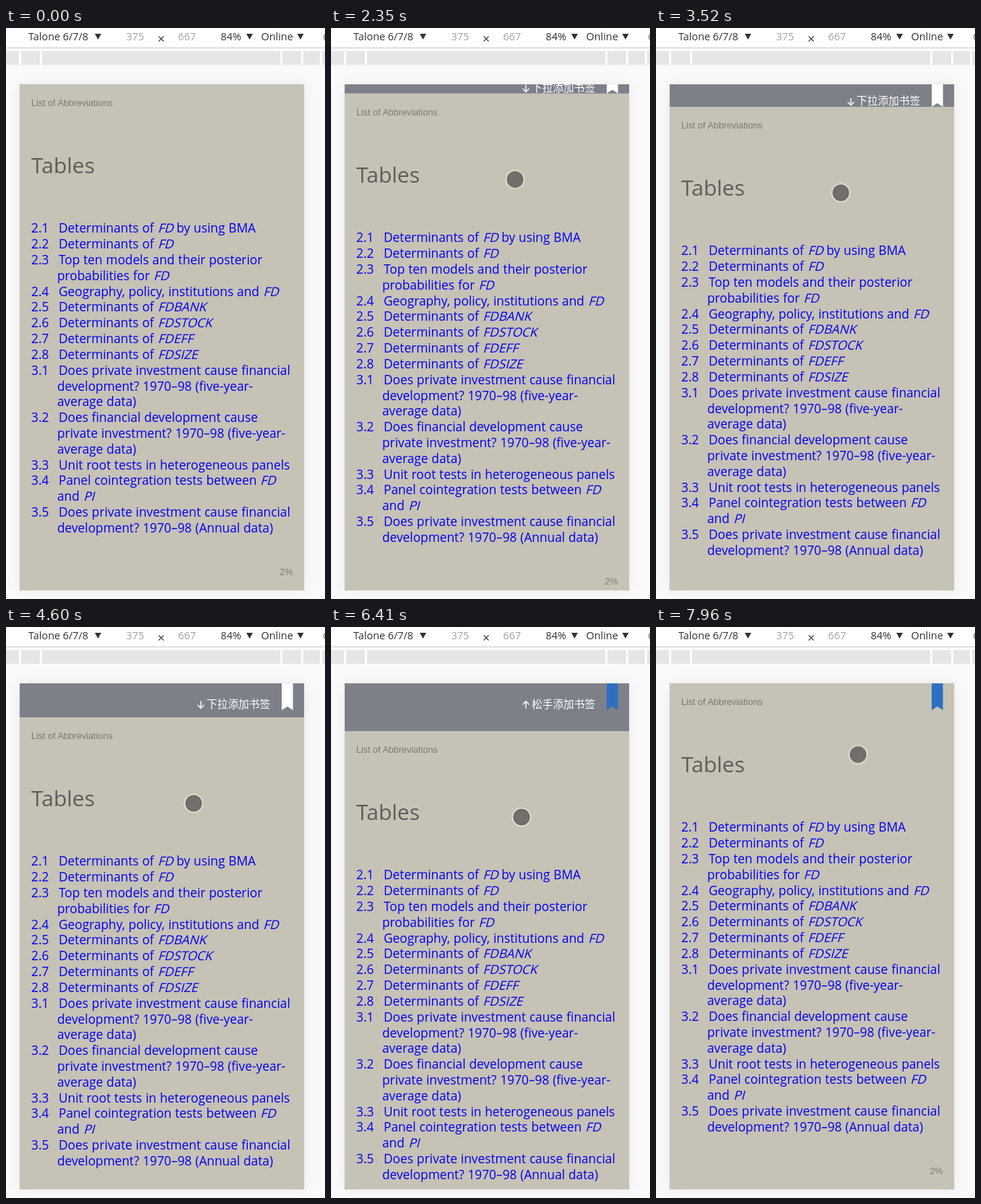
These frames come from a looping animation (442x790 px, 8 s). An HTML page:

```html
<!DOCTYPE html>
<html lang="en">
<head>
<meta charset="utf-8">
<title>Pull down to bookmark</title>
<style>
/* --pull: finger travel, --grip: how far the page follows it, --pin: bookmark held in place */
@property --pull { syntax: "<length>"; inherits: true; initial-value: 0px; }
@property --grip { syntax: "<number>"; inherits: true; initial-value: 0; }
@property --pin { syntax: "<length>"; inherits: true; initial-value: 0px; }
@property --x { syntax: "<length>"; inherits: true; initial-value: 365px; }

html, body { margin: 0; width: 100%; height: 100%; overflow: hidden; background: #fafafa; }
#stage {
  position: relative; width: 442px; height: 790px; overflow: hidden; background: #fafafa;
  font-family: "Open Sans", "Noto Sans", sans-serif;
  animation: pull 8s linear infinite, grip 8s linear infinite, pin 8s step-end infinite, drift 8s linear infinite;
}
#stage div, #stage svg, #stage span, h1 { position: absolute; margin: 0; }
#stage span, h1 { white-space: pre; }

#bar { left: 0; top: 0; width: 442px; height: 27px; background: #fff; border-bottom: 1px solid #ccc;
  font-size: 14.4px; line-height: 24px; color: #333; }
#bar span { top: 0; }
#bar .dim { color: #a3a3a3; }
#ruler { left: 0; top: 32px; width: 442px; height: 19px; background:
  linear-gradient(90deg, #e6e6e6 18px, #fff 18px 21px, #e6e6e6 21px 47px, #fff 47px 50px, #e6e6e6 50px 380px,
  #fff 380px 383px, #e6e6e6 383px 409px, #fff 409px 412px, #e6e6e6 412px 435px, #fff 435px 438px, #e6e6e6 438px); }

#device { left: 19px; top: 78px; width: 394px; height: 700px; overflow: hidden; background: #7d8089;
  box-shadow: 0 0 0 1px #e9e9e8, 0 0 20px rgba(0, 0, 0, .07);
  --d: calc(max(0px, var(--pull)) * var(--grip)); }

#hint { left: 0; top: -19.3px; width: 394px; height: 20px; color: #fff;
  font: 500 14.7px/20px "Noto Sans CJK SC", "Noto Sans CJK", sans-serif;
  transform: translateY(min(var(--d), 36.5px)); }
#hint span { left: 259px; top: 0; }
#hint svg { left: 245px; top: 6px; animation: flip 8s linear infinite; }
.before { animation: before 8s step-end infinite; }
.after { animation: after 8s step-end infinite; }

#page { left: 0; top: 0; width: 394px; height: 700px; background: #c6c2b6; transform: translateY(var(--d)); }
.note { font: 12.6px/20px "Liberation Sans", Arial, sans-serif; color: #7b7a77; }
h1 { left: 16px; top: 92.4px; font-size: 30px; line-height: 40px; font-weight: 400; color: #5f5d59; }
#list { left: 16px; top: 188.4px; font-size: 17.3px; line-height: 21.82px; word-spacing: .4px; color: #00e; }
#list p { margin: 0; height: 21.82px; white-space: pre; }
#list b { display: inline-block; width: 38px; font-weight: 400; }
#list i { display: inline-block; font-style: normal; transform: skewX(-15deg); transform-origin: 0 81%; }
#list .more { padding-left: 36px; }

#mark { left: 363px; top: -37px; width: 15.6px; height: 37px; background: #fff;
  clip-path: polygon(0 0, 100% 0, 100% 100%, 50% 32px, 0 100%);
  transform: translateY(max(min(var(--d), 37px), var(--pin)));
  animation: tint 8s step-end infinite; }

#touch { left: -14px; top: 182.5px; width: 28px; height: 28px; border-radius: 50%;
  background: radial-gradient(circle, #706f6b 9.5px, #62615d 11px, #dddace 11.8px 13px, rgba(221, 218, 206, 0) 14px);
  transform: translate(var(--x), var(--pull)); animation: show 8s step-end infinite; }

@keyframes pull {
  0%, 2.375% { --pull: 576.5px; animation-timing-function: ease-in-out; }
  12%, 12.99% { --pull: 58.5px; }
  17.75%, 20.625% { --pull: -10.5px; }
  21.625% { --pull: 1px; }
  29.375% { --pull: 12.5px; }
  30.375%, 31.3% { --pull: 14px; }
  36.125%, 38% { --pull: 25px; }
  39% { --pull: 27px; }
  44% { --pull: 31px; }
  44.875% { --pull: 33px; }
  46.875% { --pull: 34px; }
  48.75% { --pull: 35px; }
  51.625%, 52.5% { --pull: 38px; }
  57.5%, 59.4% { --pull: 47px; }
  64.25% { --pull: 53px; }
  66.125% { --pull: 54px; }
  68.25% { --pull: 57px; }
  72.125%, 76.1% { --pull: 63px; }
  78.25% { --pull: 64px; }
  80.125%, 82.9% { --pull: 66px; }
  84% { --pull: 68px; }
  86.875%, 90.7% { --pull: 69px; }
  93.125%, 93.75% { --pull: 72px; }
  99.5%, 100% { --pull: -20.5px; }
}
@keyframes drift {
  0%, 2.375% { --x: 365px; animation-timing-function: ease-in-out; }
  12%, 12.99% { --x: 246px; }
  17.75% { --x: 252px; }
  29.375% { --x: 255px; }
  44% { --x: 256px; }
  57.5% { --x: 260px; }
  68.25% { --x: 262px; }
  80.125%, 83% { --x: 264px; }
  93.75% { --x: 266px; }
  99.5%, 100% { --x: 280px; }
}
@keyframes grip {
  0%, 20.62% { --grip: 0; }
  20.63%, 93.75% { --grip: 1; animation-timing-function: ease; }
  97.5%, 100% { --grip: 0; }
}
@keyframes pin { 0% { --pin: 0px; } 70.125%, 100% { --pin: 37px; } }
@keyframes tint { 0% { background: #fff; } 70.125%, 100% { background: #2f6fc2; } }
@keyframes before { 0% { opacity: 1; } 70.125%, 100% { opacity: 0; } }
@keyframes after { 0% { opacity: 0; } 70.125%, 100% { opacity: 1; } }
@keyframes flip { 0%, 70.125% { transform: none; } 72%, 100% { transform: rotate(180deg); } }
@keyframes show { 0% { opacity: 0; } 2.375%, 100% { opacity: 1; } }
</style>
</head>
<body>
<div id="stage">
  <div id="bar">
    <span style="left:31px">Talone 6/7/8</span>
    <span class="dim" style="left:166.5px">375</span>
    <span class="dim" style="left:238.5px">667</span>
    <span style="left:297.5px">84%</span>
    <span style="left:353.5px">Online</span>
    <svg width="442" height="27" style="left:0;top:0">
      <path fill="#333" d="M123 8h9l-4.5 8zM333 8h9l-4.5 8zM403.5 8h9l-4.5 8z"/>
      <path stroke="#444" stroke-width="1.3" d="M211.5 11.5l7 7m0-7l-7 7"/>
      <circle cx="446" cy="12.5" r="5.5" fill="none" stroke="#777" stroke-width="1.3"/>
    </svg>
  </div>
  <div id="ruler"></div>

  <div id="device">
    <div id="hint">
      <svg width="12" height="12" viewBox="-6 -6 12 12"><path fill="none" stroke="#fff" stroke-width="1.4" d="M0-5V4.5M-4.5 .3L0 4.8 4.5 .3"/></svg>
      <span class="before" lang="zh">下拉添加书签</span>
      <span class="after" lang="zh">松手添加书签</span>
    </div>
    <div id="page">
      <span class="note" style="left:16px;top:15.6px">List of Abbreviations</span>
      <h1>Tables</h1>
      <div id="list">
        <p><b>2.1</b>Determinants of <i>FD</i> by using BMA</p>
        <p><b>2.2</b>Determinants of <i>FD</i></p>
        <p><b>2.3</b>Top ten models and their posterior</p>
        <p class="more">probabilities for <i>FD</i></p>
        <p><b>2.4</b>Geography, policy, institutions and <i>FD</i></p>
        <p><b>2.5</b>Determinants of <i>FDBANK</i></p>
        <p><b>2.6</b>Determinants of <i>FDSTOCK</i></p>
        <p><b>2.7</b>Determinants of <i>FDEFF</i></p>
        <p><b>2.8</b>Determinants of <i>FDSIZE</i></p>
        <p><b>3.1</b>Does private investment cause financial</p>
        <p class="more">development? 1970–98 (five-year-</p>
        <p class="more">average data)</p>
        <p><b>3.2</b>Does financial development cause</p>
        <p class="more">private investment? 1970–98 (five-year-</p>
        <p class="more">average data)</p>
        <p><b>3.3</b>Unit root tests in heterogeneous panels</p>
        <p><b>3.4</b>Panel cointegration tests between <i>FD</i></p>
        <p class="more">and <i>PI</i></p>
        <p><b>3.5</b>Does private investment cause financial</p>
        <p class="more">development? 1970–98 (Annual data)</p>
      </div>
      <span class="note" style="right:15.5px;top:665.1px">2%</span>
    </div>
    <div id="mark"></div>
  </div>
  <div id="touch"></div>
</div>
</body>
</html>
```
